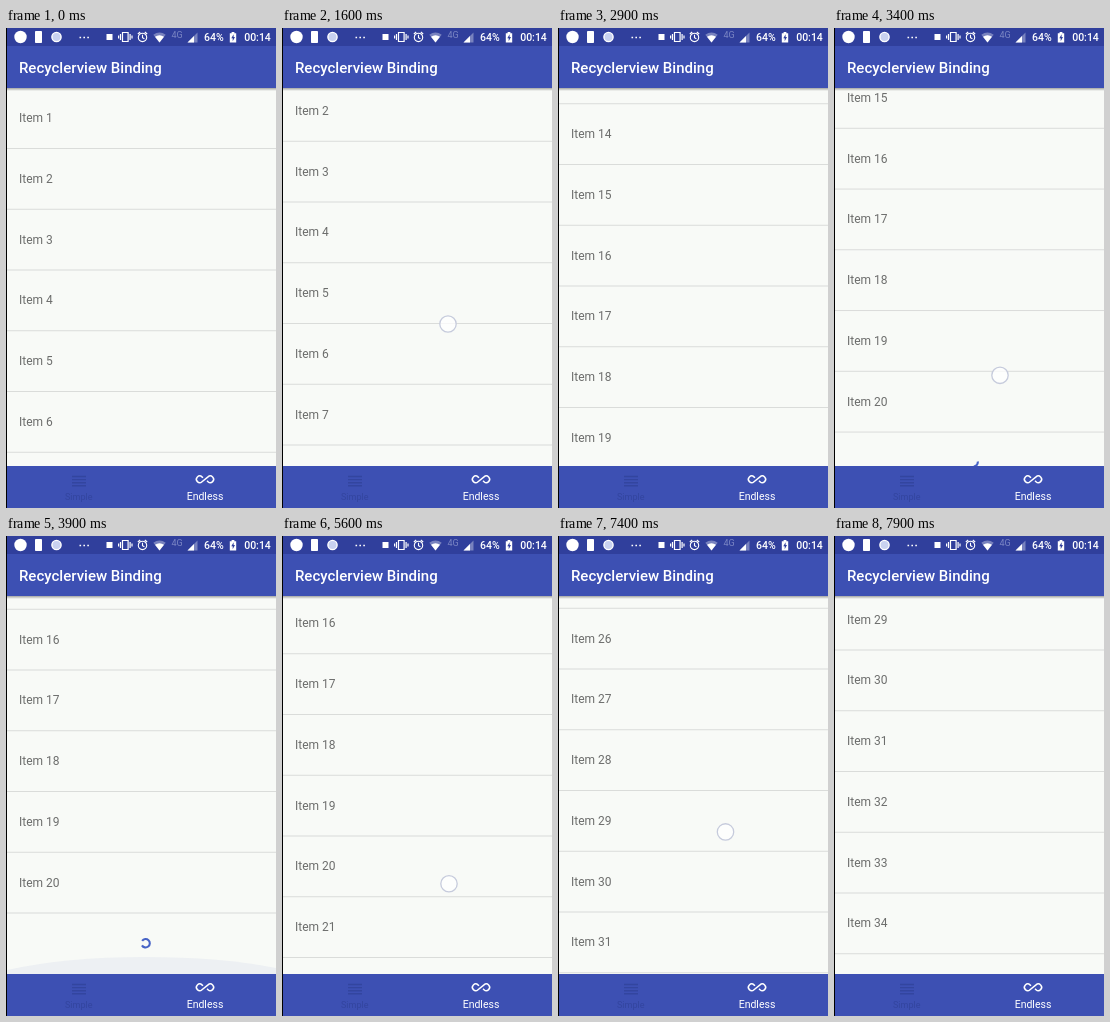
An HTML page for the animation above (8000 ms loop, 270 by 480 pixels).

```html
<!DOCTYPE html>
<html lang="en">
<head>
<meta charset="utf-8">
<title>Recyclerview Binding</title>
<style>
  html, body { margin: 0; width: 100%; height: 100%; overflow: hidden; background: #000; }
  svg { display: block; width: 100vw; height: 100vh; font-family: Roboto, sans-serif; }
</style>
</head>
<body>
<svg viewBox="0 0 270 480" preserveAspectRatio="none">
  <defs>
    <linearGradient id="shade" x2="0" y2="1">
      <stop offset="0" stop-opacity=".34"/>
      <stop offset="1" stop-opacity="0"/>
    </linearGradient>
    <clipPath id="view"><path d="M1 60H270V438H1Z"/></clipPath>
  </defs>
  <rect width="270" height="480" fill="#000"/>
  <rect x="1" y="60" width="269" height="378" fill="#f8faf7"/>

  <g clip-path="url(#view)">
    <g id="rows" font-size="12" fill="#6c6d6c"></g>
    <path id="spinner" fill="none" stroke="#4763c6" stroke-width="2.1"/>
    <path id="glow" d="M1 438V434Q60 421 138 421T270 432V438Z" fill="#3f51b5"/>
    <circle id="touch" r="8.2" fill="#fff" fill-opacity=".75" stroke="#c6cbdc" stroke-width="1.3"/>
  </g>

  <rect x="1" y="60" width="269" height="3" fill="url(#shade)"/>
  <rect x="1" width="269" height="18" fill="#303f9c"/>
  <rect x="1" y="18" width="269" height="42" fill="#3d50b3"/>
  <text x="13" y="44.8" font-size="15" font-weight="500" fill="#fff">Recyclerview Binding</text>

  <g id="status" fill="#fff">
    <circle cx="14.5" cy="9" r="6.2"/>
    <rect x="29" y="3" width="7" height="12" rx=".8"/>
    <circle cx="50.5" cy="9" r="4.6" fill="#c9d2f0" stroke="#fff" stroke-width="1.4"/>
    <path d="M73.5 8.8h1.6v1.5h-1.6zM77.4 8.8h1.6v1.5h-1.6zM81.3 8.8h1.6v1.5h-1.6z"/>
    <rect x="100.5" y="6" width="6" height="6"/>
    <path d="M116.5 4.5h5.6v9h-5.6zM114.5 6v6M124.1 6v6M112.6 7.5v3M126 7.5v3" fill="none" stroke="#fff" stroke-width="1.2"/>
    <path d="M132.3 9.4a4.2 4.2 0 1 0 8.4 0a4.2 4.2 0 1 0-8.4 0M136.5 6.8v2.8l1.9 1.2M131.8 6l2.4-2M141.2 6l-2.4-2" fill="none" stroke="#fff" stroke-width="1.1"/>
    <path d="M147.3 6.8Q153.5 2.4 159.7 6.8L153.5 14.4Z" fill-opacity=".35"/>
    <path d="M149 8.8Q153.5 5.8 158 8.8L153.5 14.4Z"/>
    <text x="165.5" y="9.5" font-size="9" fill="#7b86c4">4G</text>
    <path d="M191.5 4.5V14.5H181.5Z" fill-opacity=".35"/>
    <path d="M188 8V14.5H181.5Z"/>
    <text x="198" y="12.9" font-size="10.5" font-weight="500">64%</text>
    <path d="M225.6 4h2.8v1.2h1.8v9.3h-6.4V5.2h1.8z"/>
    <path d="M227.6 6.3l-2.3 4h1.4v2.9l2.3-4.1h-1.4z" fill="#303f9c"/>
    <text x="238.2" y="12.9" font-size="10.5" font-weight="500">00:14</text>
  </g>

  <rect x="1" y="438" width="269" height="42" fill="#3d50b3"/>
  <path d="M66 448.5h14M66 451.6h14M66 454.7h14M66 457.8h14" stroke="#33459f" stroke-width="1.4"/>
  <text x="72.7" y="472.2" font-size="9" text-anchor="middle" fill="#33459f">Simple</text>
  <path d="M197 449.8l-1-.9a3.3 3.3 0 1 0 0 4.8l6-4.8a3.3 3.3 0 1 1 0 4.8l-1-.9" fill="none" stroke="#fff" stroke-width="1.5"/>
  <text x="199" y="472.4" font-size="10.5" text-anchor="middle" fill="#fff">Endless</text>
</svg>
<script>
const LOOP = 8000, STEP = 100;
const TOP = 60, ROW = 60.75, PAGE = 20, LOADED = 4800;
const NS = 'http://www.w3.org/2000/svg';
const $ = id => document.getElementById(id);
const clamp = v => Math.max(0, Math.min(1, v));

// scroll offset over time: drags followed by decaying flings
const scrollKeys = [
  [0, 0], [1420, 0], [1500, 14], [1600, 68], [1700, 150], [1800, 235], [2000, 362],
  [2300, 453.5], [2420, 464], [2500, 490], [2600, 556], [2700, 638], [2900, 773.75],
  [3100, 843], [3300, 866], [3420, 872], [3600, 897.75], [5520, 897.75],
  [5600, 914], [5700, 974], [5800, 1070], [6000, 1258], [6200, 1378.5], [6400, 1424],
  [6700, 1438], [7040, 1438], [7200, 1457], [7400, 1506.25], [7600, 1603],
  [7900, 1707.5], [8000, 1727]
];

// touches: start, end, x, y at start of drag, scroll offset at start of drag
const touches = [
  [1500, 1700, 166, 364, 0],
  [2500, 2700, 166, 364, 464],
  [3400, 3700, 166, 350, 868],
  [5600, 5800, 167, 364, 897.75],
  [7100, 7400, 167.5, 364.2, 1438]
];

const slope = i => (scrollKeys[i + 1][1] - scrollKeys[i][1]) / (scrollKeys[i + 1][0] - scrollKeys[i][0]);

function tangent(i) {
  if (i < 1 || i > scrollKeys.length - 2) return 0;
  const a = slope(i - 1), b = slope(i);
  return a * b > 0 ? 2 * a * b / (a + b) : 0;
}

function scrollAt(t) {
  let i = 0;
  while (i < scrollKeys.length - 2 && t >= scrollKeys[i + 1][0]) i++;
  const [t0, a] = scrollKeys[i], [t1, b] = scrollKeys[i + 1];
  const h = t1 - t0, u = (t - t0) / h, v = 1 - u;
  return a * (1 + 2 * u) * v * v + b * u * u * (3 - 2 * u)
    + h * u * v * (v * tangent(i) - u * tangent(i + 1));
}

function add(parent, tag, attrs) {
  const el = document.createElementNS(NS, tag);
  for (const k in attrs) el.setAttribute(k, attrs[k]);
  return parent.appendChild(el);
}

const rows = Array.from({ length: 8 }, () => {
  const g = add($('rows'), 'g', {});
  const label = add(g, 'text', { x: 13, y: 34.2 });
  add(g, 'rect', { x: 1, y: 60, width: 269, height: 1, fill: '#dadcda' });
  return { g, label };
});

function drawRows(t, scroll) {
  const first = Math.floor(scroll / ROW);
  const count = t < LOADED ? PAGE : 2 * PAGE;
  rows.forEach(({ g, label }, i) => {
    const n = first + i;
    label.textContent = 'Item ' + (n + 1);
    g.setAttribute('transform', `translate(0 ${TOP + n * ROW - scroll})`);
    const fresh = n >= PAGE ? clamp((t - LOADED + 100) / 200) : 1;
    g.setAttribute('opacity', n < count ? fresh : 0);
  });
}

function drawSpinner(t, scroll) {
  const cx = 139.6, cy = TOP + PAGE * ROW + 30 - scroll, r = 4.2;
  const u = t - 3900;
  const from = (215 + u * .45) * Math.PI / 180;
  const sweep = (180 + 115 * Math.cos(u / 1333 * 2 * Math.PI)) * Math.PI / 180;
  const at = a => `${cx + r * Math.cos(a)} ${cy + r * Math.sin(a)}`;
  $('spinner').setAttribute('d', `M${at(from)}A${r} ${r} 0 ${sweep > Math.PI ? 1 : 0} 1 ${at(from + sweep)}`);
  $('spinner').setAttribute('opacity', t < LOADED ? 1 : 0);
}

function drawTouch(t, scroll) {
  const hit = touches.find(([a, b]) => t >= a && t <= b);
  $('touch').setAttribute('opacity', hit ? 1 : 0);
  if (!hit) return;
  const [, , x, y, base] = hit;
  $('touch').setAttribute('cx', x);
  $('touch').setAttribute('cy', y + base - scroll);
}

function draw(t) {
  const scroll = scrollAt(t);
  drawRows(t, scroll);
  drawSpinner(t, scroll);
  drawTouch(t, scroll);
  const glow = Math.min(clamp((t - 3500) / 200), clamp((4300 - t) / 500));
  $('glow').setAttribute('opacity', glow * .07);
}

const start = performance.now();
function tick() {
  const t = (performance.now() - start) % LOOP;
  draw(Math.floor(t / STEP) * STEP);
  requestAnimationFrame(tick);
}
tick();
</script>
</body>
</html>
```
